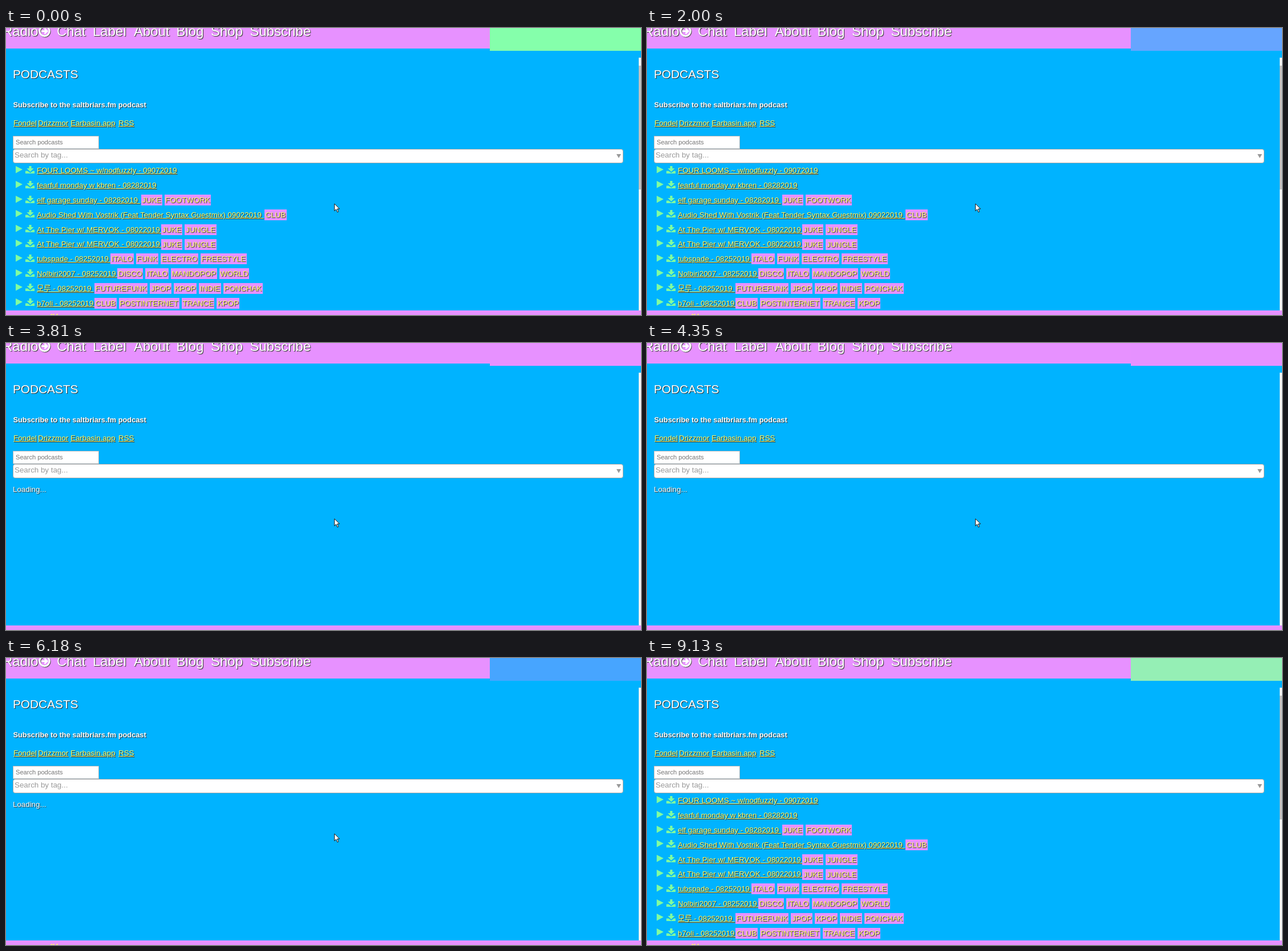
An HTML page that plays this animation: 1113x503 px, repeating every 9.23 s.

```html
<!DOCTYPE html>
<html lang="en">
<head>
<meta charset="utf-8">
<title>Podcasts</title>
<style>
html, body { margin: 0; width: 100%; height: 100%; overflow: hidden; }
#stage {
  position: relative; width: 1113px; height: 503px; overflow: hidden;
  background: #00b3ff; color: #fff;
  font: 13.333px "Liberation Sans", "Noto Sans CJK KR", "Noto Sans CJK", sans-serif;
}
#stage div, svg { position: absolute; box-sizing: border-box; }
.text { line-height: 0; white-space: pre; text-shadow: 1px 1px 1px #333; }
.plain { text-shadow: none; }
.link { color: #ffff66; text-decoration: underline; }
.tags { display: flex; gap: 4px; color: #ffff66; }
.tags span { padding: 0 1.5px; height: 19px; line-height: 19px; background: #e791ff; }
</style>
</head>
<body>
<div id="stage"></div>
<script>
const LOOP = 9230, PINK = '#e791ff';
const stage = document.getElementById('stage');

function add(parent, className, css, content = '') {
  const el = document.createElement('div');
  el.className = className;
  el.style.cssText = css;
  el.innerHTML = content;
  parent.append(el);
  return el;
}
const box = (x, y, w, h, css, parent = stage) =>
  add(parent, '', `left:${x}px;top:${y}px;width:${w}px;height:${h}px;${css}`);

// Places text by its baseline.
const text = (x, baseline, content, { size = 13.333, className = '', css = '', parent = stage } = {}) =>
  add(parent, 'text ' + className,
    `left:${x}px;top:${baseline - 0.3465 * size}px;font-size:${size}px;${css}`, content);

const shape = (x, y, w, h, content, parent = stage) =>
  add(parent, '', `left:${x}px;top:${y}px`, `<svg width="${w}" height="${h}">${content}</svg>`);

// Header
box(0, 0, 1113, 36, `background:${PINK}`);
[[-6, 'Radio'], [89, 'Chat'], [152, 'Label'], [224, 'About'], [298.5, 'Blog'],
 [359, 'Shop'], [427.5, 'Subscribe']].forEach(([x, label]) => text(x, 14, label, { size: 24 }));
shape(57, -5, 23, 23, `<g fill="none" stroke-width="3">
  <g stroke="#555" transform="translate(1 1)"><circle cx="10.5" cy="10.5" r="8.7"/></g>
  <g stroke="#fff"><circle cx="10.5" cy="10.5" r="8.7"/><path d="M5 10.5h9M10.5 6l4.5 4.5l-4.5 4.5"/></g></g>`);
const logo = box(848, -225, 265, 265, '');

// Page heading, links and search fields
text(12, 88, 'PODCASTS', { size: 20.8 });
text(12.5, 139, 'Subscribe to the saltbriars.fm podcast', { size: 12.8, css: 'font-weight:bold' });
[[13, 'Fondel'], [56, 'Drizzmor'], [113, 'Earbasin.app'], [197, 'RSS']]
  .forEach(([x, label]) => text(x, 172, label, { className: 'link' }));
box(12, 189, 151, 23, 'background:#fff;border:1px solid #a9b4ba');
text(17, 204, 'Search podcasts', { size: 11.1, className: 'plain', css: 'color:#757575' });
box(12, 212, 1070, 25, 'background:#fff;border:1px solid #aaa;border-radius:4px');
text(15, 228, 'Search by tag...', { className: 'plain', css: 'color:#999' });
shape(1070, 221, 8, 7, '<path d="M0 0h8l-4 7z" fill="#999"/>');

// Scrollbar and footer
box(1109, 52, 4, 443, 'background:#f5f5f5');
box(0, 494.5, 1113, 9, `background:${PINK}`);
const footerMark = shape(78, 501, 16, 2,
  '<path d="M0 2l3-1.5M4 2l3-2M10 2l3-2" stroke="#ffff66" stroke-width="1.5"/>');

// Podcast list
const list = box(0, 0, 1113, 494.5, 'overflow:hidden');
box(1109, 66, 4, 217, 'background:#c1c1c1', list);
const podcasts = [
  ['FOUR LOOMS ~ w/nodfuzzly - 09072019'],
  ['fearful monday w kbren - 08282019'],
  ['elf garage sunday - 08282019 ', 236.5, 'JUKE FOOTWORK'],
  ['Audio Shed With Vostrik (Feat Tender Syntax Guestmix) 09022019 ', 453, 'CLUB'],
  ['At The Pier w/ MERVOK - 08022019 ', 272, 'JUKE JUNGLE'],
  ['At The Pier w/ MERVOK - 08022019 ', 272, 'JUKE JUNGLE'],
  ['tubspade - 08252019 ', 183, 'ITALO FUNK ELECTRO FREESTYLE'],
  ['Nolbiri2007 - 08252019 ', 195, 'DISCO ITALO MANDOPOP WORLD'],
  ['모루 - 08252019 ', 155, 'FUTUREFUNK JPOP KPOP INDIE PONCHAK'],
  ['b7oli - 08252019 ', 155, 'CLUB POSTINTERNET TRANCE KPOP'],
];
podcasts.forEach(([title, tagX, tags], i) => {
  const y = 255 + 25.8 * i;
  shape(17, Math.round(y - 13), 34, 17, `<g fill="#80ff9f">
    <path d="M0 0l12 6l-12 6.5z"/>
    <path d="M23.5-2h4v6h4l-6 6l-6-6h4z"/>
    <path d="M17 8.5h4l4.5 3.5l4.5-3.5h3v4.5h-16z"/></g>`, list);
  text(54, y, title, { className: 'link', parent: list });
  if (tags) {
    add(list, 'tags', `left:${tagX}px;top:${Math.round(y - 14.5)}px;text-shadow:1px 1px 1px #333`,
      tags.split(' ').map(tag => `<span>${tag}</span>`).join(''));
  }
});
const loading = text(12, 262, 'Loading...');

const cursor = shape(575, 307, 12, 18,
  '<path d="M.7 1v12.5l2.9-2.7l2.2 5l2-.9l-2.2-4.9h4z" fill="#fff" stroke="#111"/>');

// Logo colour stops; equal neighbours hold the colour.
const stops = [
  [0, 133, 255, 171], [720, 120, 215, 208], [1110, 116, 205, 217], [1700, 112, 190, 230],
  [2000, 102, 165, 255], [2700, 102, 165, 255], [2840, 122, 162, 255], [3420, 190, 152, 255],
  [3810, 231, 145, 255], [4300, 231, 145, 255], [5010, 223, 148, 251], [5700, 223, 148, 251],
  [6180, 71, 165, 255], [6850, 71, 165, 255], [7530, 155, 220, 148], [9130, 149, 239, 181],
  [LOOP, 133, 255, 171],
];
function logoColor(t) {
  const i = stops.findIndex(stop => stop[0] > t);
  const a = stops[i - 1], b = stops[i];
  const k = (t - a[0]) / (b[0] - a[0]);
  return `rgb(${[1, 2, 3].map(c => Math.round(a[c] + (b[c] - a[c]) * k))})`;
}

const show = (el, visible) => { el.style.visibility = visible ? 'visible' : 'hidden'; };

function draw(now) {
  const t = Math.max(0, now) % LOOP;
  const isLoading = t >= 2840 && t < 6970;
  show(list, !isLoading);
  show(loading, isLoading);
  show(footerMark, t < 2840 || t >= 5950);
  show(cursor, t < 7680);
  logo.style.background = logoColor(t);
}

const start = performance.now();
function tick() {
  draw(performance.now() - start);
  requestAnimationFrame(tick);
}
tick();
</script>
</body>
</html>
```
